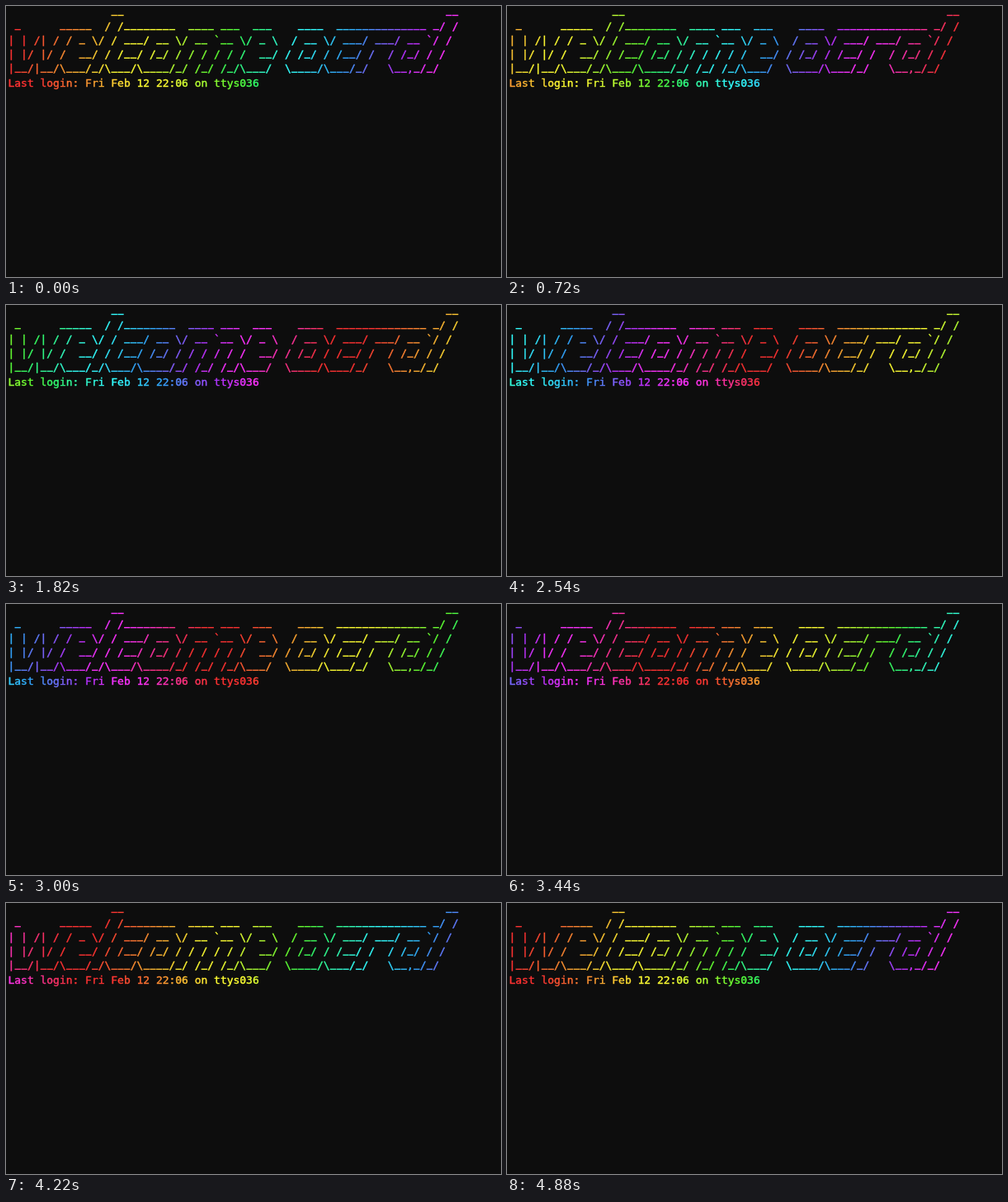
Animation of 600 by 329 pixels, one loop 4900 ms. Source, as an HTML page:

```html
<!DOCTYPE html>
<html lang="en">
<head>
<meta charset="utf-8">
<title>Rainbow login banner</title>
<style>
  html, body { margin: 0; width: 100%; height: 100%; overflow: hidden; background: #0d0d0d; }
  svg { display: block; width: 100%; height: 100%; }
  text {
    font: 13px "DejaVu Sans Mono", "Liberation Mono", monospace;
    stroke: currentColor;
    stroke-width: 0.4px;
  }
  text, rect { fill: currentColor; }
</style>
</head>
<body>
<svg id="stage" viewBox="0 0 600 329"></svg>
<script>
const LOOP = 4900, STEP = 20;
const CELL = 7.8, LEFT = 2.5, PITCH = 17.25, BASE = 11.3;
const PERIOD = 85; // columns per full rainbow
const NS = "http://www.w3.org/2000/svg";
const stage = document.getElementById("stage");

// Each banner row: greeting, then name
const banner = [
  ["                __",
   "                         __"],
  [" _      _____  / /________  ____ ___  ___",
   "  ____  ______________ _/ /"],
  ["| | /| / / _ \\/ / ___/ __ \\/ __ `__ \\/ _ \\",
   " / __ \\/ ___/ ___/ __ `/ /"],
  ["| |/ |/ /  __/ / /__/ /_/ / / / / / /  __/",
   "/ /_/ / /__/ /  / /_/ / /"],
  ["|__/|__/\\___/_/\\___/\\____/_/ /_/ /_/\\___/",
   "\\____/\\___/_/   \\__,_/_/"]
].map(([greeting, name]) => greeting.padEnd(43) + name);
const login = "Last login: Fri Feb 12 22:06 on ttys036";

// Full within `inner` columns of the centre, fading out at `outer`
function channel(u, centre, inner, outer) {
  const d = Math.abs(u - centre) % PERIOD;
  const dist = Math.min(d, PERIOD - d);
  const level = Math.max(0, Math.min(1, (outer - dist) / (outer - inner)));
  return Math.round(50 + 205 * level);
}

function rainbow(u) {
  const r = channel(u, 4, 20, 34);
  const g = channel(u, 34, 14, 30);
  const b = channel(u, 59, 13, 24);
  return `rgb(${r},${g},${b})`;
}

function add(tag, attrs) {
  const el = document.createElementNS(NS, tag);
  for (const key in attrs) el.setAttribute(key, attrs[key]);
  return stage.appendChild(el);
}

const cells = [];

// `lag` shifts the rainbow of the line, in columns
function addLine(line, row, lag) {
  const y = BASE + row * PITCH;
  [...line].forEach((ch, col) => {
    if (ch === " ") return;
    const x = LEFT + col * CELL;
    const el = ch === "_"
      ? add("rect", { x: x + 0.2, y: y - 0.6, width: CELL - 0.4, height: 1.4 })
      : add("text", { x, y });
    if (ch !== "_") el.textContent = ch;
    cells.push({ el, pos: col + lag });
  });
}

banner.forEach((line, row) => addLine(line, row, row));
addLine(login, banner.length, 0);

function draw(ms) {
  const t = Math.floor((ms % LOOP) / STEP) * STEP;
  const shift = PERIOD * t / LOOP;
  for (const { el, pos } of cells) el.setAttribute("color", rainbow(pos + shift));
}

const start = performance.now();
function tick() {
  draw(performance.now() - start);
  requestAnimationFrame(tick);
}
tick();
</script>
</body>
</html>
```
